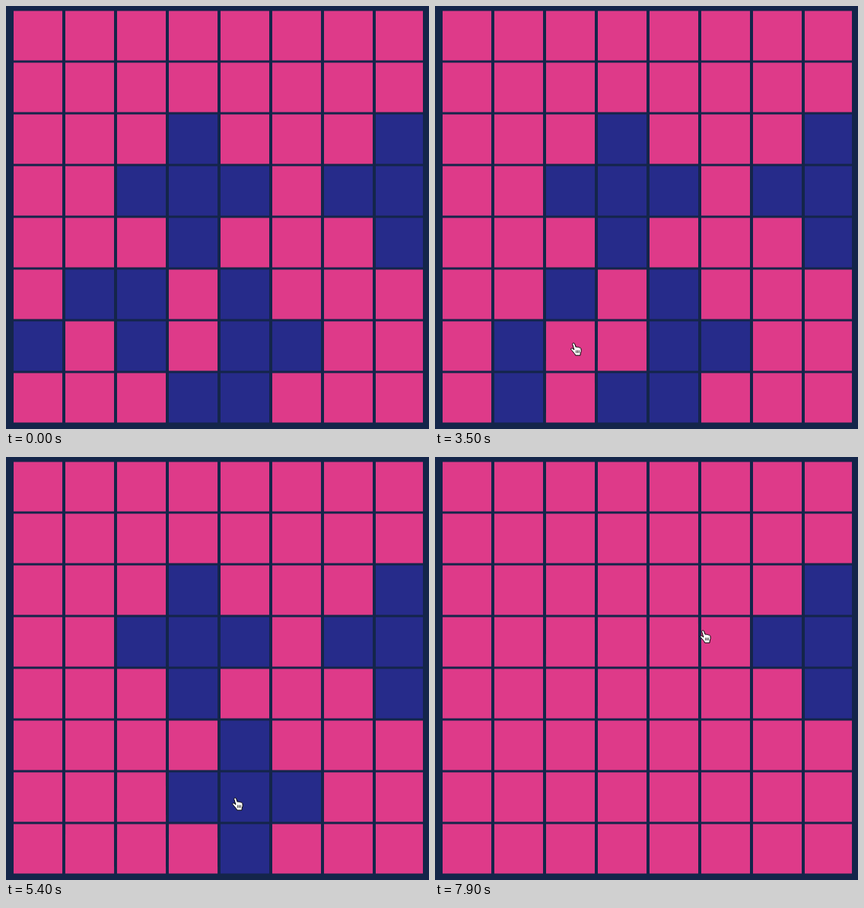
Animation of 556x556 px, one loop 8 s. Source, as an HTML page:

```html
<!DOCTYPE html>
<html lang="en">
<head>
<meta charset="utf-8">
<title>Lights puzzle</title>
<style>
  html, body { margin: 0; width: 100%; height: 100%; overflow: hidden; background: #14254a; }
  #board { position: absolute; left: 0; top: 0; width: 556px; height: 556px; overflow: hidden; }
  .cell { position: absolute; height: 66px; transform-style: preserve-3d; }
  .face {
    position: absolute; inset: 0; box-sizing: border-box;
    border-block: 1px solid #14254a80; /* softens the upper and lower edge */
    backface-visibility: hidden; background: #de3a89;
  }
  .face.dark { background: #262b8a; transform: rotateX(180deg); }
  #hand { position: absolute; left: 0; top: 0; width: 15px; height: 18px; overflow: visible; }
</style>
</head>
<body>
<div id="board"></div>
<svg id="hand" viewBox="0 0 15 18">
  <path d="M2.9 3.2 C2.2 1.1 4.6 .1 5.5 1.8 L7.2 6.4 C7.6 5.7 9 5.8 9.3 6.7 C9.8 6.1 11.2 6.2 11.6 7.2 C12.4 6.8 13.7 7.3 13.9 8.5 C14.3 10.7 14.2 12.3 13.3 14 L13 17.2 H6.6 C6.2 15.3 4 13.6 2.4 11.3 C1.7 10.2 .4 9.6 .7 8.6 C1.2 7.4 2.8 7.9 3.6 8.8 L4.9 10 Z"
    fill="#fff" stroke="#000" stroke-linejoin="round"/>
  <path d="M7.6 10.5 V14.2 M9.5 10.5 V14.2 M11.4 10.5 V14.2" fill="none" stroke="#000" stroke-width=".8"/>
</svg>
<script>
const LOOP = 8000, FLIP = 800, GLIDE = 500;
const SIZE = 8, PITCH = 68, RIGHT = 548;
// time, row, column; each click turns a plus of cells
const clicks = [[2120, 6, 1], [3480, 6, 2], [4740, 7, 2], [5740, 6, 4], [7310, 3, 3]];
const unsolved = [Infinity, 3, 7];
// arrival time, x, y of the pointer
const stops = [
  [1500, 65, 445], [1900, 102, 442], [3050, 178, 442], [4200, 185, 464], [4600, 177, 500],
  [5400, 297, 447], [6500, 259, 282], [7000, 231, 237], [7900, 348, 227]
];
const board = document.getElementById("board");
const loop = { duration: LOOP, iterations: Infinity };

function flipFrames(row, col) {
  const touches = ([, r, c]) => Math.abs(r - row) + Math.abs(c - col) <= 1;
  // A cell starts dark when an odd number of pluses covers it.
  let angle = [...clicks, unsolved].filter(touches).length % 2 * 180;
  const key = time => ({
    offset: Math.min(time / LOOP, 1),
    transform: `perspective(1000px) rotateX(${angle}deg)`
  });
  const frames = [key(0)];
  for (const click of clicks.filter(touches)) {
    frames.push({ ...key(click[0]), easing: "ease" });
    angle = 180 - angle;
    frames.push(key(click[0] + FLIP));
  }
  return [...frames, key(LOOP)];
}

function glideFrames() {
  const key = (time, [x, y]) => ({
    offset: time / LOOP,
    transform: `translate(${x}px, ${y}px)`
  });
  let last = 0, at = [-20, 450];
  const frames = [key(0, at)];
  for (const [time, ...next] of stops) {
    frames.push({ ...key(Math.max(last, time - GLIDE), at), easing: "ease-in-out" }, key(time, next));
    last = time;
    at = next;
  }
  return [...frames, key(LOOP, at)];
}

for (let row = 0; row < SIZE; row++) {
  for (let col = 0; col < SIZE; col++) {
    const cell = document.createElement("div");
    const left = 10 + PITCH * col;
    cell.className = "cell";
    cell.style.left = left + "px";
    cell.style.top = 6 + PITCH * row + "px";
    cell.style.width = Math.min(64, RIGHT - left) + "px";
    cell.innerHTML = '<div class="face"></div><div class="face dark"></div>';
    board.append(cell);
    cell.animate(flipFrames(row, col), loop);
  }
}
document.getElementById("hand").animate(glideFrames(), loop);
</script>
</body>
</html>
```
